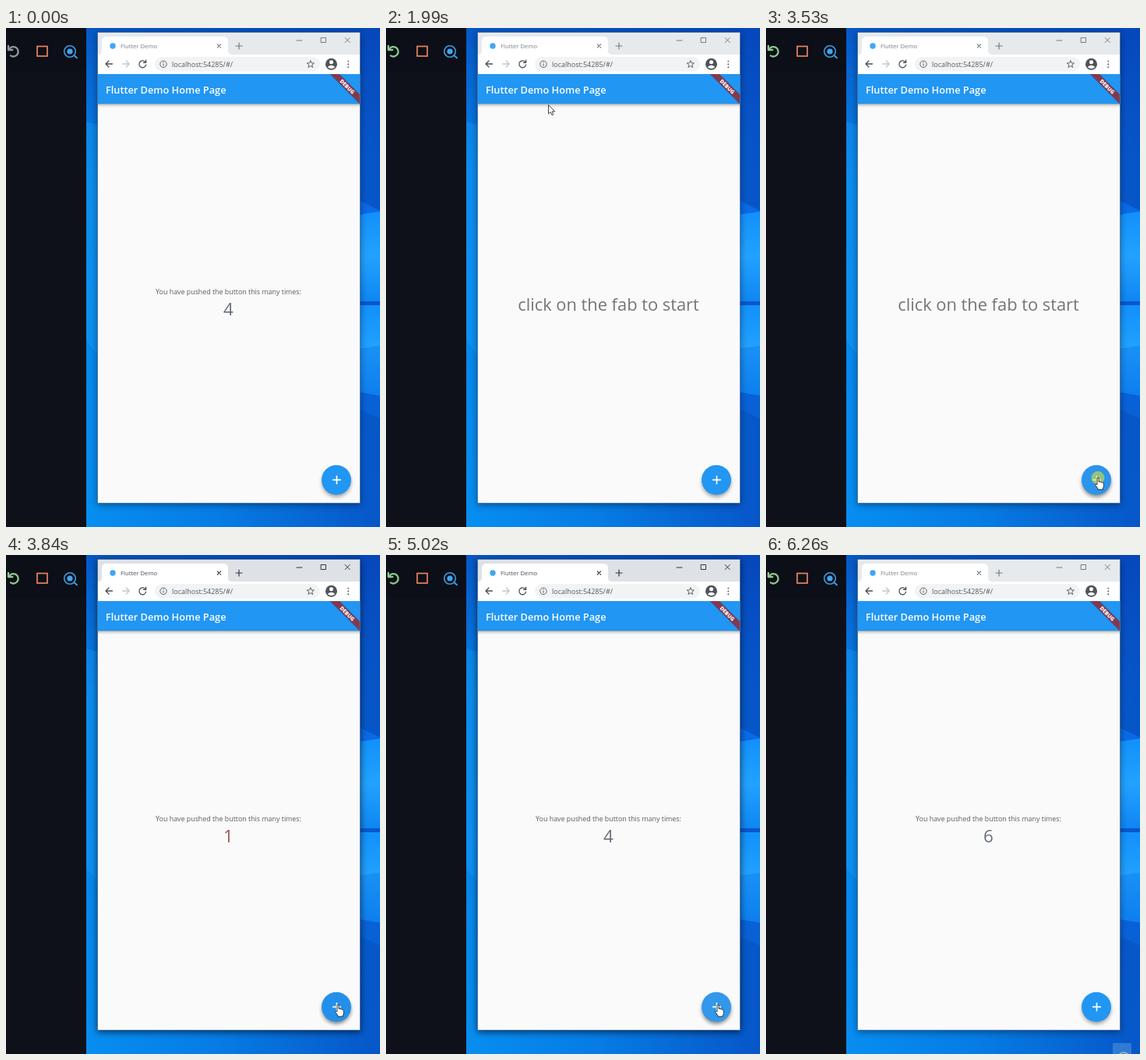
Animation of 480 by 639 pixels, one loop 6330 ms. Source, as an HTML page:

```html
<!DOCTYPE html>
<html lang="en">
<head>
<meta charset="utf-8">
<title>Counter demo</title>
<style>
  html, body { margin: 0; width: 100%; height: 100%; overflow: hidden; background: #0e1119; }
  svg { display: block; width: 100vw; height: 100vh; }
  text { font-family: "Open Sans", "Noto Sans", sans-serif; }
  .line { fill: none; stroke-linecap: round; stroke-linejoin: round; }
</style>
</head>
<body>
<svg viewBox="0 0 480 639" preserveAspectRatio="none">
  <defs>
    <linearGradient id="sky" x1="103" y1="0" x2="480" y2="0" gradientUnits="userSpaceOnUse">
      <stop offset="0" stop-color="#078ef0"/>
      <stop offset=".45" stop-color="#067ce4"/>
      <stop offset="1" stop-color="#0756c8"/>
    </linearGradient>
    <linearGradient id="dusk" x1="0" y1="0" x2="0" y2="1">
      <stop offset="0" stop-color="#0640b4" stop-opacity=".7"/>
      <stop offset=".3" stop-color="#0650c4" stop-opacity=".2"/>
      <stop offset="1" stop-color="#0650c4" stop-opacity="0"/>
    </linearGradient>
    <linearGradient id="pane" x1="0" y1="0" x2="0" y2="1">
      <stop offset="0" stop-color="#1290fa"/>
      <stop offset=".5" stop-color="#22a2ff"/>
      <stop offset="1" stop-color="#0f86f2"/>
    </linearGradient>
    <linearGradient id="barShade" x1="0" y1="0" x2="0" y2="1">
      <stop offset="0" stop-color="#000" stop-opacity=".34"/>
      <stop offset=".4" stop-color="#000" stop-opacity=".12"/>
      <stop offset="1" stop-color="#000" stop-opacity="0"/>
    </linearGradient>
    <filter id="blur" x="-20%" y="-20%" width="140%" height="140%">
      <feGaussianBlur stdDeviation="4"/>
    </filter>
    <filter id="soft" x="-40%" y="-40%" width="180%" height="180%">
      <feGaussianBlur stdDeviation="2.4"/>
    </filter>
    <clipPath id="appBar"><rect x="118" y="59" width="336" height="60"/></clipPath>
  </defs>

  <!-- desktop -->
  <rect x="103" width="377" height="639" fill="url(#sky)"/>
  <rect x="103" width="377" height="639" fill="url(#dusk)"/>
  <path d="M103 120L118 124V420L103 400Z" fill="#18a0fa" opacity=".35"/>
  <path d="M440 214L480 234V240L440 241Z" fill="#0a6ae6"/>
  <path d="M440 241L480 235V350H440Z" fill="url(#pane)"/>
  <path d="M440 355H480V471L440 464Z" fill="url(#pane)"/>
  <path d="M440 412L480 407V471L440 464Z" fill="#0a74e6" opacity=".4"/>
  <path d="M440 464L480 471V500L440 482Z" fill="#0a66dc" opacity=".7"/>
  <g id="corner">
    <rect x="445" y="625" width="24" height="14" fill="#5b9bdc" opacity=".5"/>
    <circle cx="459" cy="644" r="7" fill="none" stroke="#a9b7ae" stroke-width="1.6"/>
  </g>

  <!-- editor toolbar -->
  <rect width="103" height="639" fill="#0e1119"/>
  <rect width="103" height="55" fill="#0c0f17"/>
  <g id="restart" class="line" stroke-width="2.3">
    <path d="M4.2 27A6.2 6.2 0 1 1 6 35.4"/>
    <path d="M3 22.8V28H8.4"/>
  </g>
  <rect x="40" y="23.5" width="13" height="12.5" fill="none" stroke="#e8835f" stroke-width="1.7"/>
  <g class="line" stroke="#3a9de0" stroke-width="1.6">
    <circle cx="82" cy="30" r="7.3"/>
    <path d="M87.5 35.2L91 38.3" stroke-width="2"/>
  </g>
  <circle cx="82" cy="30" r="3.6" fill="#42a5f5"/>

  <!-- browser window -->
  <rect id="winShade" x="117" y="7" width="338" height="604" filter="url(#blur)"/>
  <rect x="117.5" y="5.5" width="337" height="603" fill="#fafafa" stroke="#1c4f8c" stroke-opacity=".55" stroke-width="1"/>
  <rect id="strip" x="118" y="6" width="336" height="29"/>
  <path d="M118 34Q123 34 123 29V17Q123 11 129 11H279Q285 11 285 17V29Q285 34 290 34Z" fill="#fff"/>
  <rect x="118" y="34" width="336" height="25" fill="#fff"/>
  <circle cx="137" cy="23" r="3.7" fill="#42a5f5"/>
  <text id="tabName" x="147" y="25.8" font-size="7.7">Flutter Demo</text>
  <g class="line" id="controls" stroke-width="1">
    <path d="M271.3 20.8L275.7 25.2M275.7 20.8L271.3 25.2" stroke-width="1.2"/>
    <path d="M295 23H303M299 19V27" stroke-width="1.2"/>
    <path d="M373 16H380M404.5 12.5H410.5V18.5H404.5ZM435.2 12.5L441.3 18.6M441.3 12.5L435.2 18.6"/>
  </g>
  <g class="line" stroke="#4b4f54" stroke-width="1.3">
    <path d="M136.5 46H128.2M132 42L128 46L132 50"/>
    <path d="M149.7 46H158M154.2 42L158.2 46L154.2 50" stroke="#c3c6ca"/>
    <path d="M178.6 43.4A4.4 4.4 0 1 0 179.6 47.2M179.6 41.2V44.4H176.4"/>
  </g>
  <rect x="191" y="37" width="212" height="18.5" rx="9.25" fill="#f1f3f4"/>
  <circle cx="202" cy="46.3" r="4.2" fill="none" stroke="#5f6368"/>
  <path d="M202 45.7V48.6M202 43.7V44.7" stroke="#5f6368" stroke-width="1.1"/>
  <text x="213" y="49.8" font-size="8.97" fill="#55595e">localhost:54285/#/</text>
  <path id="star" fill="none" stroke="#5f6368" stroke-width="1"/>
  <circle cx="417.5" cy="46.3" r="7.5" fill="#50545a"/>
  <circle cx="417.5" cy="43.8" r="2.5" fill="#fff"/>
  <path d="M412.7 50Q417.5 45.6 422.3 50Q417.5 54.2 412.7 50Z" fill="#fff"/>
  <path d="M439.3 42.6V42.61M439.3 46.4V46.41M439.3 50.2V50.21" stroke="#50545a" stroke-width="1.9" stroke-linecap="round"/>

  <!-- app -->
  <rect x="118" y="97" width="336" height="5" fill="url(#barShade)"/>
  <rect x="118" y="59" width="336" height="38" fill="#2196f3"/>
  <text x="128" y="84" font-size="12.75" font-weight="600" fill="#fff">Flutter Demo Home Page</text>
  <g clip-path="url(#appBar)">
    <g transform="translate(454 59) rotate(45)">
      <rect x="-27" y="18.2" width="54" height="9" fill="#000" opacity=".28"/>
      <rect x="-26.7" y="18.7" width="53.4" height="8" fill="#84384f"/>
      <text y="25.2" font-size="6.8" font-weight="800" fill="#fff" text-anchor="middle">DEBUG</text>
    </g>
  </g>
  <text id="hint" x="285.5" y="362" font-size="21.85" fill="#757575" text-anchor="middle">click on the fab to start</text>
  <g id="tally" text-anchor="middle">
    <text x="285.5" y="341" font-size="8.87" fill="#5c5c5c">You have pushed the button this many times:</text>
    <text id="count" x="285.3" y="368" font-size="22.4"></text>
  </g>
  <circle id="fabShade" cx="424" cy="582" r="18.5" filter="url(#soft)"/>
  <circle id="fab" cx="424" cy="578.7" r="19"/>
  <circle id="flash" cx="424" cy="578.7" r="19" fill="#fff"/>
  <path d="M419 578.7H430M424.5 573.2V584.2" stroke="#fff" stroke-width="1.7"/>

  <!-- pointer -->
  <g id="pointer">
    <circle id="press" r="8.5" fill="#d8e044" opacity=".6"/>
    <path id="arrow" d="M0 0V11.5L2.7 9L4.6 13.1L6.4 12.3L4.6 8.4H8.2Z" fill="#fff" stroke="#333" stroke-width=".9"/>
    <path id="hand" d="M-1 .3Q0 -1 1.1 .3V5.2Q2.4 4.3 3.3 5.6Q4.6 4.9 5.4 6.2Q7.2 5.9 7.4 7.6V10.4Q7.3 12.5 6.3 13.4V15H-.2V13.6L-3.3 9.4Q-3.7 7.7 -2.2 7.9L-1 8.9Z" fill="#fff" stroke="#222" stroke-width=".9" stroke-linejoin="round"/>
  </g>
</svg>

<script>
const LOOP = 6330, TICKS = 82;
const $ = id => document.getElementById(id);
const show = (id, on) => $(id).setAttribute('visibility', on ? 'visible' : 'hidden');
const set = (id, attrs) => {
  for (const key in attrs) $(id).setAttribute(key, attrs[key]);
};

// Pointer stops: tick, x, y
const path = [
  [1, 450, 626], [3, 397, 528], [5, 255, 320], [7, 95, 112], [9, 22, 35], [10, 15, 28],
  [21, 15, 28], [22, 27, 40], [23, 57, 61], [24, 108, 77], [25, 163, 88], [26, 208.5, 98.5],
  [28, 242, 117], [30, 255, 126], [32, 255, 126], [33, 222, 104], [34, 183, 77],
  [35, 247, 125], [36, 302, 250], [37, 372, 400], [38, 434, 530], [39, 461, 580],
  [40, 443.5, 585.5], [41, 438, 590], [42, 433, 583], [44, 426, 576],
  [73, 426, 576], [74, 441, 624]
];
const presses = [46, 53, 58, 62, 67, 71];
const glow = [.04, .06, .16, .07];
const inRange = (v, from, to) => v >= from && v < to;

function pointerAt(tick) {
  let i = 1;
  while (i < path.length - 1 && path[i][0] < tick) i++;
  const [t0, x0, y0] = path[i - 1], [t1, x1, y1] = path[i];
  const p = Math.min(1, Math.max(0, (tick - t0) / (t1 - t0)));
  return [x0 + (x1 - x0) * p, y0 + (y1 - y0) * p];
}

function starPath(cx, cy) {
  const points = Array.from({ length: 10 }, (_, i) => {
    const r = i % 2 ? 2.1 : 4.9, a = i * Math.PI / 5 - Math.PI / 2;
    return (cx + r * Math.cos(a)).toFixed(2) + ' ' + (cy + r * Math.sin(a)).toFixed(2);
  });
  return 'M' + points.join('L') + 'Z';
}

function draw(ms) {
  // The screen refreshes on a coarse grid.
  const tick = Math.min(TICKS - 1, Math.floor((ms + 30) / (LOOP / TICKS)));
  const active = inRange(tick, 47, 81);
  const restarted = tick >= 20;
  const pushed = presses.filter(p => tick >= p + 2).length;
  const hover = inRange(tick, 42, 76);
  const onFab = inRange(tick, 42, 74);
  const held = tick === 15 || presses.some(p => inRange(tick, p, p + 2));
  const last = presses.filter(p => tick >= p).pop();

  set('restart', { stroke: restarted ? '#8bc98b' : '#8c9a98' });
  set('winShade', { opacity: active ? .62 : .4 });
  set('strip', { fill: active ? '#dee1e6' : '#e7eaed' });
  set('controls', { stroke: active ? '#33373b' : '#777b80' });
  set('tabName', { fill: active ? '#4a4e53' : '#7b8085' });

  show('hint', restarted && !pushed);
  show('tally', !restarted || pushed);
  const value = restarted ? pushed : 4;
  $('count').textContent = value;
  set('count', { fill: value === 1 ? '#9a5854' : '#687079' });

  set('fab', { fill: hover ? '#2290ea' : '#2196f3' });
  set('fabShade', { opacity: hover ? .48 : .38 });
  set('flash', { opacity: glow[tick - last] || 0 });

  const [x, y] = pointerAt(tick);
  set('pointer', { transform: `translate(${x.toFixed(2)} ${y.toFixed(2)})` });
  const visible = inRange(tick, 1, 75);
  show('arrow', visible && !onFab);
  show('hand', visible && onFab);
  show('press', visible && held);
  show('corner', tick === TICKS - 1);
}

set('star', { d: starPath(390.8, 46.5) });
const start = performance.now();
function frame() {
  draw((performance.now() - start) % LOOP);
  requestAnimationFrame(frame);
}
frame();
</script>
</body>
</html>
```
